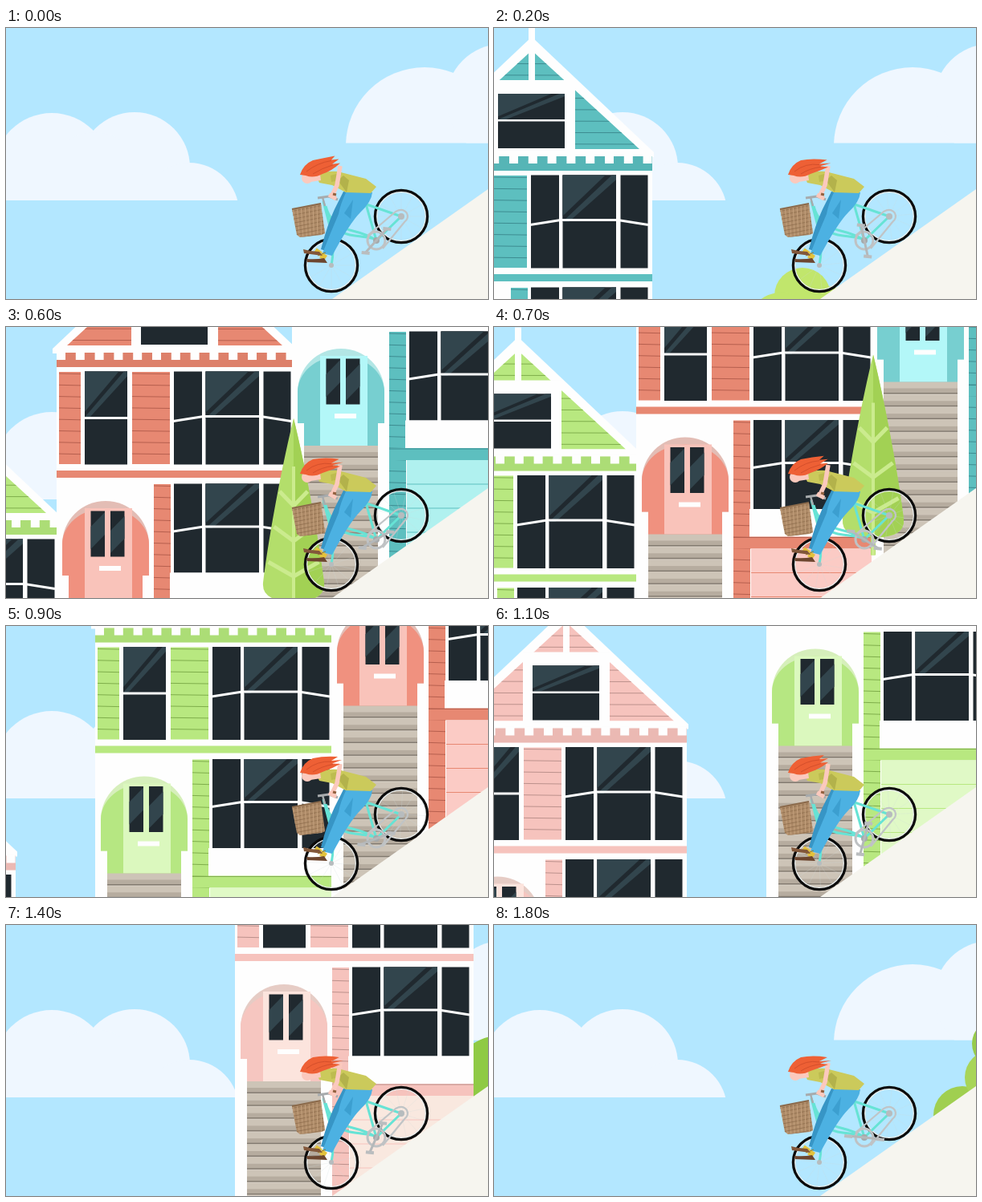
Animation of 600x338 px, one loop 1.9 s. Source, as an HTML page with a canvas:

```html
<!DOCTYPE html>
<html lang="en">
<head>
<meta charset="utf-8">
<title>Downhill ride</title>
<style>
html, body { margin: 0; width: 100%; height: 100%; overflow: hidden; background: #b3e7ff; }
canvas { display: block; }
</style>
</head>
<body>
<canvas id="stage" width="600" height="338"></canvas>
<script>
const c = document.getElementById('stage').getContext('2d');
const LOOP = 1900, STEP = 100, DX = 114, DY = -79.5;
const WHITE = '#fefefe', GLASS = '#20292f', SHINE = '#32454d';

function rect(color, x, y, w, h) {
  c.fillStyle = color;
  c.fillRect(x, y, w, h);
}
function trace(points) {
  c.beginPath();
  for (let i = 0; i < points.length; i += 2) c.lineTo(points[i], points[i + 1]);
}
function poly(color, ...points) {
  trace(points);
  c.fillStyle = color;
  c.fill();
}
function line(color, width, ...points) {
  trace(points);
  c.strokeStyle = color;
  c.lineWidth = width;
  c.stroke();
}
function shape(color, d) {
  c.fillStyle = color;
  c.fill(new Path2D(d));
}
function curve(color, width, d) {
  c.strokeStyle = color;
  c.lineWidth = width;
  c.stroke(new Path2D(d));
}
function disc(color, x, y, r) {
  c.beginPath();
  c.arc(x, y, r, 0, 7);
  c.fillStyle = color;
  c.fill();
}
function ring(color, width, x, y, r) {
  c.beginPath();
  c.arc(x, y, r, 0, 7);
  c.strokeStyle = color;
  c.lineWidth = width;
  c.stroke();
}
function at(x, y, draw) {
  c.save();
  c.translate(x, y);
  draw();
  c.restore();
}

function sky() {
  rect('#b3e7ff', 0, 0, 600, 338);
  const cloud = (base, circles) => {
    c.save();
    c.beginPath();
    c.rect(0, 0, 600, base);
    c.clip();
    for (const [x, y, r] of circles) disc('#eff7ff', x, y, r);
    c.restore();
  };
  cloud(215, [[57, 178, 72], [160, 174, 69], [228, 230, 62], [110, 190, 60]]);
  cloud(143.5, [[521, 147, 98], [618, 90, 70]]);
}

// House palettes: wall, groove, arch, door, garage, arch top
const TEAL = ['#5dbfbf', '#3d8c91', '#77cfd0', '#b3f7f8', '#b0f1ef', '#b2e6e5'];
const SALMON = ['#e78872', '#b65f4e', '#f0917f', '#f9c3ba', '#fbcbc5', '#e3bdb5'];
const GREEN = ['#b8e880', '#7fae4b', '#b6e782', '#dbf8be', '#e0f9c6', '#d6efbb'];
const PINK = ['#f6c3bd', '#bc918c', '#f6c6c0', '#fce4dd', '#f9e8df', '#e6ccc5'];

function siding([wall, groove], x, y, w, h) {
  rect(wall, x, y, w, h);
  for (let i = y + 2; i < y + h; i += 14.3) line(groove, 1, x, i, x + w, i + .6);
}
function pane(x, y, w, h, shiny) {
  rect(GLASS, x, y, w, h);
  if (!shiny) return;
  at(x, y, () => {
    poly(SHINE, 0, 0, w * .8, 0, 0, h * .88);
    poly(SHINE, w * .92, 0, w, 0, w, h * .1, w * .12, h, 0, h);
  });
}
function bay(y, h) {
  const mid = y + h / 2 - 2;
  pane(146, y, 35, h);
  pane(185.5, y, 66.5, h);
  pane(185.5, y, 66.5, h / 2, true);
  pane(257.5, y, 34, h);
  line(WHITE, 3, 145, mid + 6, 183, mid, 254, mid, 292, mid + 6);
}
function gable(colors) {
  poly(WHITE, 147, -296, 299, -152, 299, -146, -5, -146, -5, -152);
  c.save();
  trace([147, -279, 281, -156, 13, -156]);
  c.clip();
  siding(colors, 0, -279, 297, 123);
  c.restore();
  rect(WHITE, 143, -308, 8, 70);
  rect(WHITE, 93, -242, 108, 96);
  pane(105, -225, 83, 68);
  pane(105, -225, 83, 32, true);
  rect(WHITE, 105, -193, 83, 2.5);
}
function steps() {
  for (let y = 159; y < 600; y += 15.8) {
    rect('#cdc4b7', 15, y, 92, 16);
    rect('#b6ac9f', 15, y + 8, 92, 6);
    rect('#81796f', 15, y + 13.5, 92, 1.4);
  }
}
function battlement(wall, groove) {
  rect(wall, 0, -147, 297, 18);
  c.globalAlpha = .2;
  rect(groove, 0, -147, 297, 18);
  c.globalAlpha = 1;
  for (let x = 0; x < 290; x += 23.8) rect(WHITE, x, -149, 11, 11);
}
function house(colors) {
  const [wall, groove, arch, door, garage, archTop] = colors;
  gable(colors);
  rect(WHITE, 0, -148, 297, 760);
  battlement(wall, groove);

  siding(colors, 3, -123, 27, 115);
  siding(colors, 94, -123, 47, 115);
  pane(35, -123.5, 53, 116);
  pane(35, -123.5, 53, 57, true);
  rect(WHITE, 35, -67, 53, 3);
  bay(-123.5, 116);
  rect(wall, 0, 0, 297, 9);

  shape(archTop, 'M7 131V92A54 54 0 0 1 115 92V131Z');
  shape(arch, 'M7 131V92A54 45 0 0 1 115 92V131H107V160H15V131Z');
  rect(door, 35, 47, 59, 112);
  pane(42.5, 50.5, 17.5, 57);
  pane(67, 50.5, 17.5, 57);
  poly(SHINE, 42.5, 70, 60, 52, 60, 80, 42.5, 98);
  poly(SHINE, 67, 75, 84.5, 57, 84.5, 85, 67, 103);
  rect(WHITE, 53, 119, 27, 6);
  steps();

  siding(colors, 121, 17, 21, 585);
  bay(16.5, 111);
  rect(WHITE, 141, 127.5, 156, 35);
  rect(wall, 121, 162, 176, 15);
  line(groove, 1, 121, 163, 297, 163);
  rect(garage, 143, 177, 154, 430);
  for (let y = 207; y < 600; y += 30) line(wall, 1, 143, y, 297, y);
}
function tree() {
  shape('#b3de6b', 'M0 0C-12 48-30 140-38 205Q-40 228-3 228V250H3V228Q40 228 38 205C30 140 12 48 0 0Z');
  shape('#a2d154', 'M0 0V228Q40 228 38 205C30 140 12 48 0 0Z');
  const vein = '#cbeb8e';
  line(vein, 4, 0, 60, 0, 250);
  for (const y of [109, 153, 197]) line(vein, 5, -y * .16, y - 18, 0, y, y * .16, y - 18);
}

// Everything passing by, placed as at the start of the loop
const passing = [
  [70, 612, () => disc('#a5d154', 0, 0, 100)],
  [184, 543, () => disc('#c1e66c', 0, 0, 62)],
  [156, 493, () => disc('#c1e66c', 0, 0, 35)],
  [129, 530, () => disc('#c1e66c', 0, 0, 41)],
  [-981, 1313, () => disc('#8fca45', 0, 0, 62)],
  [-1469, 1668, () => disc('#a0cf50', 0, 0, 36)],
  [-1432, 1621, () => disc('#a8d559', 0, 0, 34)],
  [-1427, 1579, () => disc('#97cb4b', 0, 0, 30)],
  [-1311, 1149, () => house(PINK)],
  [-915, 865, () => house(GREEN)],
  [-621, 656, () => house(SALMON)],
  [-328, 466, () => house(TEAL)],
  [-326, 591, tree]
];

function wheel(x, y, turn) {
  for (let i = 0; i < 12; i++) {
    const a = turn + i * Math.PI / 6;
    line('rgba(205,215,215,.4)', .6, x, y, x + 31 * Math.cos(a), y + 31 * Math.sin(a));
  }
  ring('#e9eeee', 1.5, x, y, 30.5);
  ring('#0b0b0b', 3.3, x, y, 32.6);
}
function crank(angle) {
  const px = 20 * Math.cos(angle), py = 20 * Math.sin(angle);
  ring('#bfc2c4', 3, 461, 265, 11);
  disc('#a5a9ab', 461, 265, 4);
  at(461, 265, () => {
    line('#b4b8ba', 3, -px, -py, px, py);
    line('#babdbf', 4, -px - 5, -py, -px + 5, -py + 1);
    line('#babdbf', 4, px - 5, py, px + 5, py + 1);
  });
}
function basket() {
  c.save();
  trace([356, 226, 392, 219, 397, 256, 393, 258, 366, 261, 362, 258]);
  c.fillStyle = '#ad8a67';
  c.fill();
  c.clip();
  for (let i = 0; i < 9; i++) {
    line('#8d6c4d', .8, 354, 229 + i * 5, 400, 220 + i * 5);
    line('#c5a27e', 1, 357 + i * 5, 218, 361 + i * 4.5, 264);
  }
  c.restore();
  line('#8b6a4b', 2, 356, 226, 392, 219);
}
function bike(turn) {
  const mint = '#67e3d5';
  wheel(492, 235, turn);
  wheel(405, 296, turn);
  line(mint, 3, 449, 220, 492, 235, 461, 265, 447, 216);
  curve(mint, 3, 'M398 222Q404 246 428 252T461 265');
  curve(mint, 3, 'M400 232Q408 256 434 259T461 265');
  curve(mint, 3, 'M395 216L405 255Q409 276 405 296');
  curve('#c0c4c6', 2.2, 'M450 259L485 229Q494 224 499 231Q502 237 496 242L469 275');
  disc('#b7bcbe', 492, 235, 4);
  disc('#b7bcbe', 405, 296, 3);
  crank(-.84 - turn);
}
function rider(lift) {
  const skin = '#fbc9bd';
  line('#a7abad', 3, 388, 212, 402, 210, 413, 214);
  line('#a7abad', 2.5, 394, 211, 397, 222);
  shape('#3795c5', 'M420 204L440 206Q430 236 402 279L392 276Q400 245 409 226Z');
  shape('#4cb1e2', 'M424 203L456 205Q455 217 441 230Q428 243 406 284L394 281Q404 255 414 232Q416 220 424 203Z');
  shape('#3c9fd0', 'M421 231L432 214L429 238Z');
  line('#e3c23c', 6, 385, 277, 392, 282);
  line('#e3c23c', 7, 392, 283, 398, 287);
  line('#9a7b2e', 1, 388, 284, 398, 280);
  shape('#82573a', 'M370 276Q380 279 390 279L394 284L371 281Z');
  shape('#6d462f', 'M374 288Q386 289 396 287L400 293L375 292Z');
  shape('#cbca5b', 'M386 184Q396 178 413 179L448 188L461 198L454 206L423 205L406 196L390 193Z');
  shape('#b3b24b', 'M424 205L413 190L420 184L427 190Z');
  shape('#bdbc4f', 'M404 184L418 180L415 190L405 192Z');
  line(skin, 5.5, 416, 172, 412, 196, 405, 211);
  line(skin, 5, 402, 208, 411, 213);
  line('#94613f', 3, 407, 207, 411, 208);
  disc(skin, 375, 187, 7);
  poly(skin, 379, 183, 391, 182, 392, 190, 379, 192);
  at(374, 182, () => {
    shape('#ee6035', `M-8 1Q-4-12 8-17Q22-20 ${36 + lift} ${-22 + lift}L31 ${-17 + lift}L${41 + lift} ${-18 + lift}L32 ${-12 + lift / 2}L42 ${-13 + lift}Q32-4 20 0Q9 6-1 2Z`);
    curve('#d44f2b', 1, `M0-3Q14-14 31 ${-16 + lift}M8 0Q19-7 33 ${-11 + lift / 2}`);
  });
}

function render(now) {
  const step = Math.floor(now % LOOP / STEP);
  const turn = step * 117 * Math.PI / 180;
  sky();
  for (const [x, y, draw] of passing) {
    const px = x + step * DX, py = y + step * DY;
    if (px > -310 && px < 710) at(px, py, draw);
  }
  poly('#f6f5ef', 406, 338, 600, 201, 600, 338);
  bike(turn);
  rider(2 + 3 * Math.sin(step * 1.55 - 1));
  basket();
}
const start = performance.now();
function tick() {
  render(performance.now() - start);
  requestAnimationFrame(tick);
}
c.lineJoin = 'round';
tick();
</script>
</body>
</html>
```
